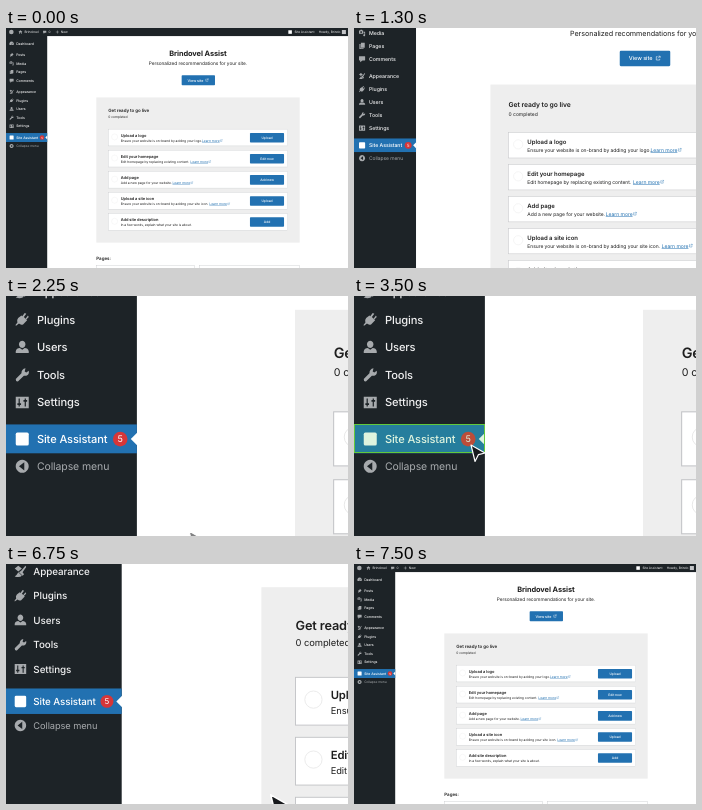
These frames come from a looping animation (342 by 240 pixels, 8000 ms). An HTML page:

```html
<!DOCTYPE html>
<html lang="en">
<head>
<meta charset="utf-8">
<title>Admin menu zoom</title>
<style>
  html, body { margin: 0; width: 100%; height: 100%; overflow: hidden; background: #fff; }
  svg { display: block; width: 342px; height: 240px; }
  text { font-family: Inter, "Liberation Sans", sans-serif; letter-spacing: -.009em; text-rendering: geometricPrecision; white-space: pre; }
</style>
</head>
<body>
<svg id="stage" viewBox="0 0 342 240" xmlns="http://www.w3.org/2000/svg">
  <g id="page"></g>
  <g id="hover" opacity="0">
    <rect x="0" y="128" width="131" height="29" fill="#3cbe3c" fill-opacity=".17"/>
    <rect x=".5" y="128.5" width="130" height="28" fill="none" stroke="#62c93c"/>
  </g>
  <path id="cursor" d="M0 0L14 8L7.5 9.6L4 16.4Z" fill="#17191c" stroke="#fff" stroke-width="1.2" stroke-linejoin="round" opacity="0"/>
</svg>
<script>
const LOOP = 8000, STEP = 50, LEAD = 20;
const UNIT = 0.2525;               // stage pixels per page pixel when zoomed out
const ZOOM = 3.22, PIVOT_Y = 94.5, LEFT = 0.8;
const DARK = '#1d2327', BLUE = '#2271b1', GREY = '#a7aaad', PALE = '#f0f0f1', INK = '#1e1e1e';

const byId = id => document.getElementById(id);
const page = byId('page'), hover = byId('hover'), cursor = byId('cursor');

function add(tag, attrs, content) {
  const el = document.createElementNS('http://www.w3.org/2000/svg', tag);
  for (const key in attrs) el.setAttribute(key, attrs[key]);
  if (content !== undefined) el.textContent = content;
  return page.appendChild(el);
}

const rect = (x, y, width, height, fill, more) => add('rect', { x, y, width, height, fill, ...more });
const circle = (cx, cy, r, fill, more) => add('circle', { cx, cy, r, fill, ...more });

// y is the vertical middle of the capitals
function label(x, y, size, content, fill = INK, more) {
  return add('text', { x, y: y + size * 0.355, 'font-size': size, fill, ...more }, content);
}

function icon(x, y, d, fill = GREY, more) {
  add('path', { d, fill, 'fill-rule': 'evenodd', transform: `translate(${x} ${y})`, ...more });
}

function external(x, y, size, stroke) {
  icon(x, y, 'M4 1H1V9H9V6M6 0H10V4M10 0L5 5', 'none',
    { stroke, 'stroke-width': 1.3, transform: `translate(${x} ${y}) scale(${size / 10})` });
}

function button(x, y, w, h) {
  rect(x, y, w, h, BLUE, { rx: 3 });
}

const ICONS = {
  dashboard: 'M-8 6A9 9 0 1 1 8 6ZM-1 3L4 -4L2 4A2 2 0 0 1 -1 3Z',
  pin: 'M1 -8L8 -1L6 0L3 3L3 6L0 5L-7 8L-4 1L-6 -2L-2 -2L1 -6Z',
  media: 'M-8 -6H-5L-4 -8H0L1 -6H3V2H-8ZM-2.5 -4.5A2.3 2.3 0 1 0 -2.4 -4.5ZM4 -3H8V6A2.5 2.5 0 1 1 6 4V0H4Z',
  pages: 'M-7 -5H-4V6H4V8H-7ZM-3 -8H7V5H-3Z',
  comments: 'M-7 -7H7Q8 -7 8 -6V3Q8 4 7 4H1L-5 9V4H-7Q-8 4 -8 3V-6Q-8 -7 -7 -7Z',
  brush: 'M7 -8L8 -6L3 1L5 4L3 6L-2 1L1 -1ZM-3 1L2 6Q-1 9 -8 7Q-5 5 -3 1ZM-8 -4L-3 -8L2 -4L-3 0Z',
  plug: 'M3 -8L5 -7L2 -3L4 -1L7 -5L8 -3L5 0L6 1L1 6Q-2 7 -4 5L-8 8L-8 6L-6 4Q-7 0 -5 -2L-1 -5L0 -4Z',
  users: 'M0 -8A4 4.5 0 1 1 -.1 -8ZM-8 7V5Q-7 1 -3 1L0 3L3 1Q7 1 8 5V7Z',
  wrench: 'M4 -8L3 -4L5 -3L8 -5Q9 0 5 1L2 1L-5 8Q-8 9 -8 5L-1 -2Q-1 -7 4 -8Z',
  sliders: 'M-8 -7H8V7H-8ZM-4.5 -5V1H-6V3H-4.5V5H-3V3H-1.5V1H-3V-5ZM3 -5V-3H1.5V-1H3V5H4.5V-1H6V-3H4.5V-5Z',
  house: 'M0 -7L8 0H5V7H2V2H-2V7H-5V0H-8Z'
};

function drawContent() {
  const mid = { 'text-anchor': 'middle' };
  label(757, 101, 29.3, 'Brindovel Assist', INK, { ...mid, 'font-weight': 700 });
  label(757, 141.5, 18.8, 'Personalized recommendations for your site.', INK, mid);
  button(692.5, 187, 132, 40);
  label(716, 207, 14.6, 'View site', '#fff', { 'font-weight': 500 });
  external(787, 201, 11, '#fff');

  rect(354.5, 275, 805.5, 575, '#eee');
  label(402, 328, 17.7, 'Get ready to go live', INK, { 'font-weight': 600 });
  label(402, 352, 13.1, '0 completed');

  const tasks = [
    ['Upload a logo', 'Ensure your website is on-brand by adding your logo.', 'Upload', 773],
    ['Edit your homepage', 'Edit homepage by replacing existing content.', 'Edit now', 727],
    ['Add page', 'Add a new page for your website.', 'Add new', 656],
    ['Upload a site icon', 'Ensure your website is on-brand by adding your site icon.', 'Upload', 802],
    ['Add site description', 'In a few words, explain what your site is about.', 'Add']
  ];
  tasks.forEach(([title, about, action, linkX], i) => {
    const y = 400 + i * 83.5;
    rect(402, y + .5, 711, 66.5, '#fff', { stroke: '#c3c4c7', 'stroke-width': 1.3 });
    circle(427, y + 31.5, 12, 'none', { stroke: '#e8e8e8', 'stroke-width': 1.2 });
    label(451, y + 25, 15.7, title, INK, { 'font-weight': 600 });
    label(451, y + 46.5, 13, about);
    if (linkX) {
      label(linkX, y + 46.5, 13.2, 'Learn more', BLUE, { 'text-decoration': 'underline' });
      external(linkX + 72, y + 42, 8, BLUE);
    }
    button(963, y + 15.5, 135, 38);
    label(1030.5, y + 34.5, 13.1, action, '#fff', { ...mid, 'font-weight': 500 });
  });

  label(354.5, 911, 17.7, 'Pages:', INK, { 'font-weight': 600 });
  for (const [x, w] of [[354.5, 389], [764, 396]])
    rect(x, 940, w, 90, '#fff', { stroke: '#c3c4c7', 'stroke-width': 1.5 });
}

function drawMenu() {
  const medium = { 'font-weight': 500 };
  rect(-5, 0, 165, 1000, DARK);
  const groups = [
    [61, ['Dashboard', 'dashboard']],
    [106, ['Posts', 'pin'], ['Media', 'media'], ['Pages', 'pages'], ['Comments', 'comments']],
    [253, ['Appearance', 'brush'], ['Plugins', 'plug'], ['Users', 'users'], ['Tools', 'wrench'], ['Settings', 'sliders']]
  ];
  for (const [top, ...items] of groups)
    items.forEach(([name, shape], i) => {
      const y = top + i * 34;
      icon(19, y, ICONS[shape]);
      label(37, y, 13.7, name, PALE, medium);
    });

  rect(-5, 416, 165, 35.5, BLUE);
  rect(11, 426, 16, 16, '#fff', { rx: 2 });
  label(37, 434, 13.6, 'Site Assistant', '#fff', medium);
  circle(139.5, 434, 9, '#d63638');
  label(139.5, 434, 11.2, '5', '#fff', { 'text-anchor': 'middle' });
  icon(160.5, 434, 'M0 -8L-8 0L0 8Z', '#fff');

  icon(19, 467.5, 'M0 -8A8 8 0 1 1 -.1 -8ZM2.5 -5L-4 0L2.5 5Z');
  label(37, 467.5, 12.9, 'Collapse menu', GREY);
}

function drawTopBar() {
  rect(-5, 0, 1400, 32, DARK);
  circle(18, 16, 9, GREY);
  icon(54, 16, ICONS.house);
  label(70, 16, 13, 'Brindovel', PALE);
  icon(150, 16, ICONS.comments, GREY, { transform: 'translate(150 16) scale(.8)' });
  label(165, 16, 12.7, '0', PALE);
  icon(200, 16, 'M-1 -6H1V-1H6V1H1V6H-1V1H-6V-1H-1Z');
  label(214, 16, 13, 'New', PALE);
  rect(1115, 9, 14, 14, '#fff');
  label(1139, 16, 12.7, 'Site Assistant', PALE);
  label(1235, 16, 12.7, 'Howdy, Brindo', PALE);
  rect(1327, 8, 16, 16, '#c3c4c7');
}

const ramp = (t, from, to) => Math.min(1, Math.max(0, (t - from) / (to - from)));
const ease = (t, from, to) => (1 - Math.cos(Math.PI * ramp(t, from, to))) / 2;
const mix = (a, b, p) => a + (b - a) * p;

function render(t) {
  const zoom = mix(1, ZOOM, ease(t, 1000, 2000) - ease(t, 6500, 7500));
  page.setAttribute('transform', `translate(${LEFT} ${PIVOT_Y * (1 - zoom)}) scale(${zoom * UNIT})`);

  hover.setAttribute('opacity', ease(t, 3000, 3500) - ease(t, 5500, 6000));

  const enter = ease(t, 2000, 3000), leave = ease(t, 6250, 7250);
  const x = mix(mix(196.5, 117, enter), 395, leave);
  const y = mix(mix(252.6, 149, enter), 303, leave);
  const size = mix(1, 1.3, ramp(t, 6250, 6700));
  cursor.setAttribute('transform', `translate(${x} ${y}) scale(${size})`);
  cursor.setAttribute('opacity', t < 7250 ? ramp(t, 2000, 2500) : 0);
}

drawContent();
drawMenu();
drawTopBar();

const start = performance.now();
function tick() {
  const now = (performance.now() - start) % LOOP;
  render(Math.floor(now / STEP) * STEP + LEAD);
  requestAnimationFrame(tick);
}
tick();
</script>
</body>
</html>
```
